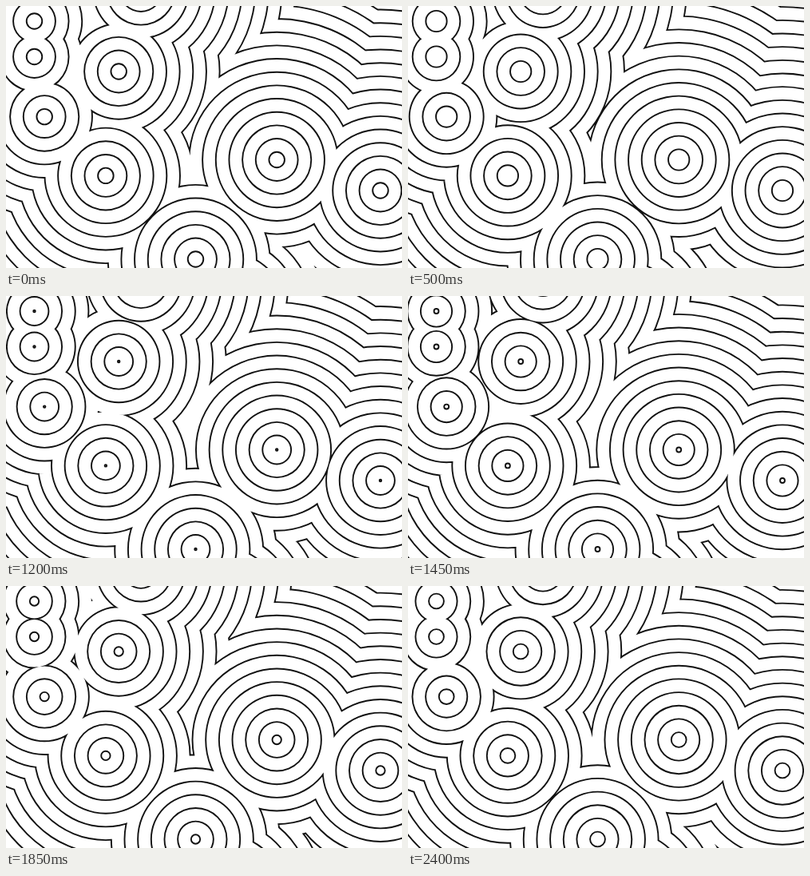
Write an HTML page with a canvas that moves like this. It is 496 by 328 pixels and loops after 2450 ms.

```html
<!DOCTYPE html>
<html lang="en">
<head>
<meta charset="utf-8">
<title>Ripples</title>
<style>
  html, body { margin: 0; width: 100%; height: 100%; overflow: hidden; background: #fff; }
  canvas { display: block; width: 496px; height: 328px; }
</style>
</head>
<body>
<canvas id="stage" width="496" height="328"></canvas>
<script>
const canvas = document.getElementById('stage');
const ctx = canvas.getContext('2d');

const LOOP = 2450;
const STEP = 50;
const GAP = 50 / 3;
const BIRTH = 1015; // moment a new ring leaves each centre
const LINE = 1.9;
const INK = '#111';
const PAPER = '#fff';

// Where the drops fall; the last two lie just outside the stage.
const drops = [
  [35.5, 19], [35.5, 63.5], [48.2, 138.6], [141.2, 82], [124.9, 212.4],
  [339.2, 192.5], [469, 231], [237.5, 317], [169, -19.5], [275, 384]
];
const rings = Math.ceil(canvas.width / 2 / GAP);

// One path for all discs, so that overlapping ripples merge.
function fillDiscs(radius, colour) {
  if (radius <= 0) return;
  ctx.beginPath();
  for (const [x, y] of drops) {
    ctx.moveTo(x + radius, y);
    ctx.arc(x, y, radius, 0, Math.PI * 2);
  }
  ctx.fillStyle = colour;
  ctx.fill();
}

function draw(time) {
  const phase = (time - BIRTH) / LOOP;
  const inner = (phase - Math.floor(phase)) * GAP;
  ctx.fillStyle = PAPER;
  ctx.fillRect(0, 0, canvas.width, canvas.height);
  for (let i = rings; i >= -1; i--) {
    const radius = inner + i * GAP;
    fillDiscs(radius + LINE / 2, INK);
    fillDiscs(radius - LINE / 2, PAPER);
  }
}

const start = performance.now();

function tick() {
  const elapsed = (performance.now() - start) % LOOP;
  draw(Math.floor(elapsed / STEP) * STEP);
  requestAnimationFrame(tick);
}

tick();
</script>
</body>
</html>
```
